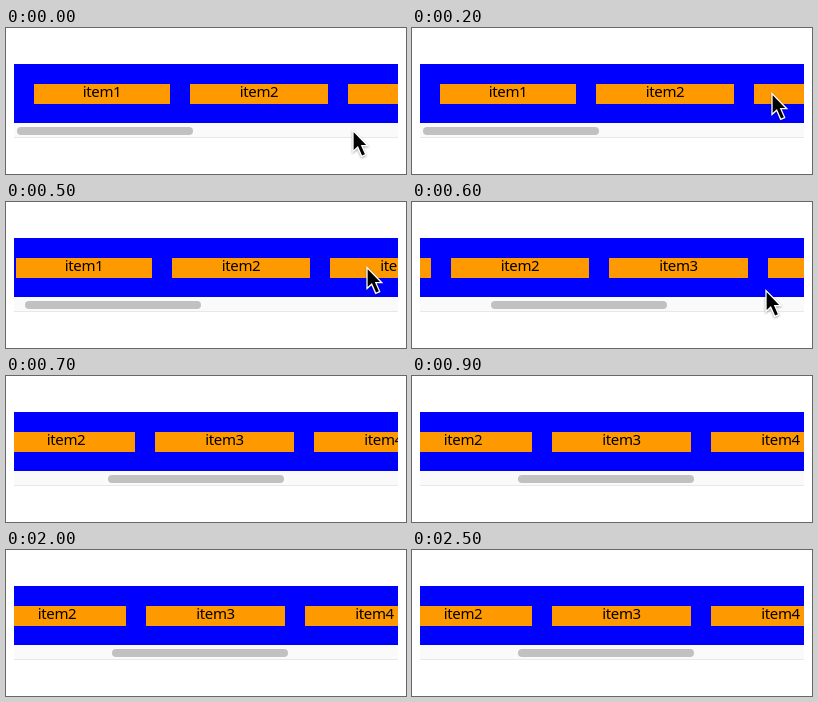
Write an HTML page that moves like this. It is 400 px wide and 146 px high and loops after 2700 ms.

```html
<!DOCTYPE html>
<html lang="en">
<head>
<meta charset="utf-8">
<title>Horizontal scroll</title>
<style>
  html, body { margin: 0; width: 100%; height: 100%; overflow: hidden; background: #fff; }
  svg { display: block; width: 400px; height: 146px; }
  text { font: 15px "Noto Sans", sans-serif; letter-spacing: -.35px; text-anchor: middle; }
  #cursor { filter: drop-shadow(0 1px 1px rgba(0, 0, 0, .35)); }
</style>
</head>
<body>
<svg viewBox="0 0 400 146">
  <clipPath id="view"><rect x="8" y="36" width="384" height="59"/></clipPath>
  <rect x="8" y="36" width="384" height="59" fill="#00f"/>
  <g clip-path="url(#view)"><g id="items"></g></g>
  <rect x="8" y="95" width="384" height="14" fill="#fafafa"/>
  <rect x="8" y="109" width="384" height="1" fill="#e8e8e8"/>
  <rect id="thumb" x="11" y="99" width="176" height="8" rx="4" fill="#c1c1c1"/>
  <path id="cursor" d="M0 .5V21.5L4.7 17.2L8.7 26.3L12.7 24.6L8.8 15.7H14.8Z" stroke="#fff" stroke-width="1.3"/>
</svg>
<script>
  const LOOP = 2700, STEP = 100, GAP = 20;
  const SCROLL_END = 202, THUMB_RATIO = 95 / SCROLL_END;
  const [items, thumb, cursor] = ["items", "thumb", "cursor"].map(id => document.getElementById(id));

  let x = 8 + GAP;
  [136, 138, 139, 139].forEach((width, i) => {
    items.innerHTML += `<rect x="${x}" y="56" width="${width}" height="20" fill="#ff9900"/>
      <text x="${x + width / 2}" y="69">item${i + 1}</text>`;
    x += width + GAP;
  });

  // Cursor key points: the pointer rises, hovers, then drops away
  const path = [
    { t: 0, x: 347, y: 102 },
    { t: 200, x: 360, y: 65 },
    { t: 500, x: 361, y: 65 },
    { t: 600, x: 354, y: 88 },
  ];

  // Swipe with a quick start and a decaying tail
  const scrollAt = t => Math.round(SCROLL_END * Math.exp(-Math.exp((544 - t) / 50.3)));

  function pointerAt(t) {
    const i = path.findIndex(key => key.t >= t);
    if (i < 1) return path[i];
    const a = path[i - 1], b = path[i], k = (t - a.t) / (b.t - a.t);
    return { x: a.x + (b.x - a.x) * k, y: a.y + (b.y - a.y) * k };
  }

  const move = (el, x, y = 0) => el.setAttribute("transform", `translate(${Math.round(x)} ${Math.round(y)})`);

  function draw() {
    const t = Math.floor(performance.now() % LOOP / STEP) * STEP;
    const left = scrollAt(t), tip = pointerAt(t);
    move(items, -left);
    move(thumb, left * THUMB_RATIO);
    cursor.style.display = tip ? "" : "none";
    if (tip) move(cursor, tip.x, tip.y);
    requestAnimationFrame(draw);
  }
  draw();
</script>
</body>
</html>
```
